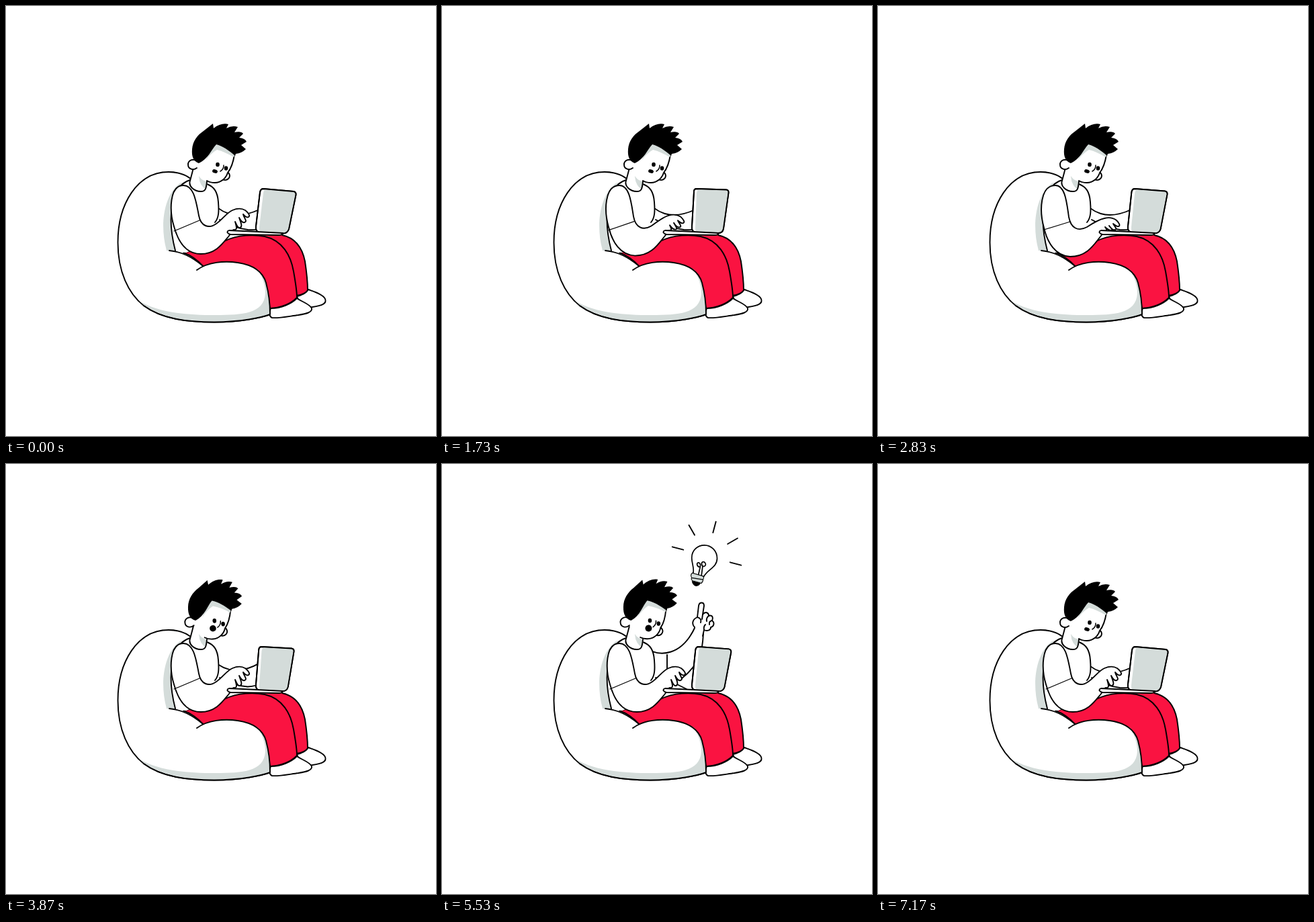
An HTML page that plays this animation: 640 by 640 pixels, repeating every 7210 ms.

```html
<!DOCTYPE html>
<html lang="en">
<head>
<meta charset="utf-8">
<title>Idea on a bean bag</title>
<style>
html, body { margin: 0; width: 100%; height: 100%; overflow: hidden; background: #fff; }
svg { display: block; width: 100vw; height: 100vh; }
.w { fill: #fff; }
.g { fill: #d4dcda; }
.r { fill: #fa1341; }
.k { fill: #000; }
.n { stroke: none; }
</style>
</head>
<body>
<svg viewBox="0 0 640 640" fill="none" stroke="#000" stroke-width="1.9" stroke-linecap="round" stroke-linejoin="round">
  <!-- bean bag, back -->
  <path class="w" d="M276 258C266 250 254 247 242 247C195 247 166.5 295 166.5 352C166.5 395 182 428 205 446C232 466 270 470.5 310 470.5C350 470 380 464 393 459"/>
  <path class="g n" d="M262 262C238 275 227 320 239 364L254 366C244 330 244 290 262 262Z"/>

  <!-- legs and shoes -->
  <path class="w" d="M433 432C440 431 447 427 450 422C458 425 472 429 475 436C478 443 470 446 456 448L440 449Z"/>
  <path class="r n" d="M370 342L411 341C430 345 441 360 445 380C448 400 449 412 449 423C446 428 440 430 432 431Z"/>
  <path d="M411 341C430 345 441 360 445 380C448 400 449 412 449 423C446 428 440 430 432 431"/>
  <path class="r" d="M264 367C290 362 310 356 325 350C345 340 370 340 385 343C412 349 424 372 428 395C431 412 433 424 433 434C424 443 410 449 393 450L380 400L340 384L294 388C285 378 275 371 264 367Z"/>
  <path class="w" d="M394 450C410 450 425 443 433 435C440 440 453 444 455 450C456 456 447 458 435 460C420 462 405 465 396 464C391 462 392 455 394 450Z"/>

  <!-- bean bag, front -->
  <path class="w n" d="M243 364C262 366 276 373 292 386L284 393C300 381 325 379 345 382C372 386 383 398 387 412C391 427 393 445 393 459L240 445Z"/>
  <path class="g n" d="M198 439C225 455 262 460 312 460C352 460 384 458 386 428C386 415 382 402 372 390C384 399 388 412 390 430L393 459C360 468 340 470 310 470C262 470 225 462 198 439Z"/>
  <path d="M284 393C300 381 325 379 345 382C372 386 383 398 387 412C391 427 393 445 393 459C380 464 350 470 310 470.5C270 470.5 232 466 205 446"/>

  <!-- far arm -->
  <path id="farArm" class="w"/>
  <path id="cuff" d="M335 284L335 306M348 327L364 335"/>
  <g id="farHand" class="w">
    <path d="M376 243C371 238 373 231 380 228L382 211C383 205 390 205 390 211L388 224C392 219 397 221 397 226C402 224 404 228 402 233C406 236 405 242 400 243C400 248 394 249 390 247L388 256"/>
    <path d="M380 228Q387 230 385 236M388 224L387 231M397 226Q393 229 394 234M402 233Q397 234 398 239M390 247Q389 242 392 239"/>
  </g>

  <!-- torso and neck -->
  <path class="w n" d="M274 259C248 266 237 310 252 366L268 367L325 345L311 322C317 310 317 300 316 292C315 276 308 267 299 265Z"/>
  <path d="M274 259C248 266 238 310 252 364M299 265C310 269 315 277 316 292C317 305 317 315 311 322M243 364C262 366 276 373 293 387"/>
  <path class="w n" d="M279 240L274 260C271 268 280 276 290 276C296 276 298 273 299 262Z"/>
  <path class="g n" d="M287 253Q292 261 300 261L298 273Q288 268 287 253Z"/>
  <path d="M279 241L274 260C271 268 280 276 290 276C297 276 298 272 299 261"/>

  <!-- head -->
  <g id="head">
    <path class="w" d="M325 247C332 245 335 253 331 257C328 260 324 259 322 258"/>
    <path class="w n" d="M283 230L300 205L342 218C339 234 336 242 330 248C328 260 310 267 299 260L284 242Z"/>
    <path d="M340 221C338 234 335 242 330 248C328 256 320 263 311 263C306 263 302 262 299 260"/>
    <path class="g n" d="M302 218L314 204L341 220L339 225C331 220 322 216 314 214Q305 219 297 230Z"/>
    <path class="w" d="M285 231C278 226 271 230 271 236C271 243 279 245 284 241"/>
    <path class="k n" d="M287 234C279 231 276 224 277 213C278 201 285 192 294 186L308 175L309 182C316 176 325 174 331 176L328 182Q337 177 345 180L340 188Q350 186 353 190L347 196Q356 197 358 202L350 207L357 213Q351 219 342 220L341 223C332 215 322 208 313 206C306 213 301 228 287 234Z"/>
    <g id="eyes" class="k n">
      <ellipse cx="315" cy="236" rx="2.8" ry="3.3"/>
      <ellipse cx="327.5" cy="241.5" rx="2.8" ry="3.3"/>
    </g>
    <path d="M324 237Q324 243 319 246" stroke-width="1.5"/>
    <ellipse id="mouth" class="k n"/>
  </g>

  <!-- near arm -->
  <path id="arm" class="w"/>
  <path id="hem" stroke-width="1.2"/>

  <!-- laptop -->
  <path id="lid" class="w"/>
  <path id="screen" class="g n"/>
  <path id="lidLine"/>
  <path class="w" d="M332 334L374 336L412 338Q411 341 406 341L334 340Q328 338 330 335Z"/>

  <!-- light bulb -->
  <g id="bulb">
    <path class="w" d="M373 161C376 153 371 145 371 135C371 122 381 114 392 114C404 114 413 124 413 136C413 151 397 154 391 166Z"/>
    <path d="M382 163L385 150C379 150 378 142 383 143Q386 145 385 150M387 165L389 149C385 144 389 140 392 142C396 146 393 150 389 149"/>
    <path class="k n" d="M371 173L386 176Q384 182 378 182Q372 180 371 173Z"/>
    <path class="g" stroke-width="1.2" d="M372 160L389 165Q392 167 390 170Q390 174 387 177L373 173Q369 171 371 168Q368 163 372 160ZM371 168L390 171"/>
  </g>
  <path id="rays"/>
</svg>
<script>
const LOOP = 7210;
const $ = id => document.getElementById(id);
const set = (id, attrs) => { for (const k in attrs) $(id).setAttribute(k, attrs[k]); };
const lerp = (a, b, u) => a + (b - a) * u;

// Blend two paths that share the same commands.
function mix(a, b, u) {
  const to = b.match(/[\d.]+/g);
  let i = 0;
  return a.replace(/[\d.]+/g, n => lerp(+n, +to[i++], u).toFixed(2));
}

// Eased value from a list of [time, value] keys.
function at(keys, t) {
  const i = keys.findIndex(k => k[0] > t);
  if (i < 0) return keys[keys.length - 1][1];
  if (!i) return keys[0][1];
  const [t0, a] = keys[i - 1], [t1, b] = keys[i];
  const u = (t - t0) / (t1 - t0);
  return lerp(a, b, u * u * (3 - 2 * u));
}

const press = [[0, 0], [440, 1], [900, .14], [1350, 1], [1760, .65], [2200, 1], [2500, 0], [2830, 1], [3150, 1], [3600, 0]];
const tilt = [[0, 0], [750, 0], [930, .6], [1730, 1], [2250, .95], [2830, .2], [3700, .6], [4700, .6], [6200, 0]];
const look = [[3620, 0], [3950, 1], [6500, 1], [6950, 0]];
const raise = [[3750, 0], [4350, 1], [6050, 1], [6330, .82], [6750, 0]];
const glow = [[4250, 0], [4430, .6], [4620, 1], [4700, 1], [4900, .9], [6400, .9], [6630, .58], [6800, 0]];
const shine = [[4700, 0], [5050, 1], [5550, 1], [5870, 0]];
const blink = [[2140, 1], [2220, .1], [2290, .1], [2370, 1]];

const armUp = "M332 342C322 354 312 369 290 369C268 369 256 350 250 328C243 305 243 267 264 267C280 267 283 292 287 312C290 328 302 332 313 324C322 318 328 308 337 304C344 301 351 301 356 304C360 307 364 312 361 314C358 316 355 312 353 310C354 315 360 321 355 322C352 323 349 319 347 315C349 321 353 329 348 330C345 331 343 325 341 321C343 328 345 334 339 333C335 334 338 333 332 342";
const armDown = "M332 342C322 354 312 373 286 373C264 372 252 352 247 330C240 305 241 267 264 267C279 267 281 294 284 314C287 331 298 336 311 329C320 323 328 318 337 316C345 314 351 316 355 319C359 323 361 327 358 328C355 329 353 326 350 324C351 327 357 332 353 333C350 334 346 330 344 327C346 330 351 334 347 334C343 334 340 331 338 329C340 332 342 334 338 335C335 335 336 336 332 342";
const farRest = "M300 285C318 308 340 320 377 303L388 322C384 332 376 334 360 333C350 332 335 328 318 318";
const farRaised = "M300 272C325 290 358 284 377 242L389 251C388 275 386 296 357 319C350 323 335 325 318 318";
const lidOpen = "M383 272L428 276Q432 277 431.5 281L421 332Q419 338.5 412 338.5L380 337.5Q371 337 372 328L378 277Q379 272 383 272Z";
const lidBack = "M379 272L423 273.5Q427 274 426.5 278L419 331Q418 338 411 338L380 337.5Q371 337 372 328L375 276Q375 272 379 272Z";
const screenOpen = "M387 273L428 276.5Q431 277 430.5 281L420.5 332Q418 338 412 338L382 337Q376 336 377 329L383 278Q384 273 387 273Z";
const screenBack = "M383 273L423 274Q426 274.5 425.5 278L418.5 331Q417 337.5 411 337.5L382 337Q376 336 377 329L379 278Q380 273 383 273Z";

function rays(s) {
  if (s < .01) return "";
  return [-75, -30, 15, 60, 105].map(deg => {
    const a = deg * Math.PI / 180, x = Math.sin(a), y = -Math.cos(a);
    const p = r => `${(394 + r * x).toFixed(1)} ${(137 + r * y).toFixed(1)}`;
    return `M${p(36)}L${p(36 + 17 * s)}`;
  }).join("");
}

function draw(t) {
  const u = at(press, t), l = at(tilt, t), h = at(look, t), r = at(raise, t), b = at(glow, t);
  set("arm", { d: mix(armUp, armDown, u) });
  set("hem", { d: mix("M250 335L288 319", "M247 333L286 321", u) });

  const lid = mix(lidOpen, lidBack, l);
  set("lid", { d: lid });
  set("lidLine", { d: lid });
  set("screen", { d: mix(screenOpen, screenBack, l) });

  set("head", { transform: `translate(${-4.5 * h} ${-h}) rotate(${-4 * h} 285 250)` });
  set("eyes", { transform: `translate(0 239) scale(1 ${at(blink, t)}) translate(0 -239)` });
  set("mouth", { cx: 311 + 1.5 * h, cy: 246 + h, rx: 4 + h, ry: 2.7 + 2.3 * h, transform: "rotate(15 311 246)" });

  set("farArm", { d: mix(farRest, farRaised, r) });
  set("cuff", { opacity: Math.min(1, Math.max(0, r * 2 - .7)), transform: `translate(${(r - 1) * 16} 0)` });
  const turn = Math.min(40, 90 * (1 - r));
  set("farHand", { transform: `translate(${8 * (1 - r)} ${66 * (1 - r)}) rotate(${turn} 384 252)` });

  set("bulb", { transform: `translate(378 182) scale(${b}) translate(-378 -182)`, visibility: b > .01 ? "visible" : "hidden" });
  set("rays", { d: rays(at(shine, t)) });
}

function tick() {
  draw(performance.now() % LOOP);
  requestAnimationFrame(tick);
}
tick();
</script>
</body>
</html>
```
